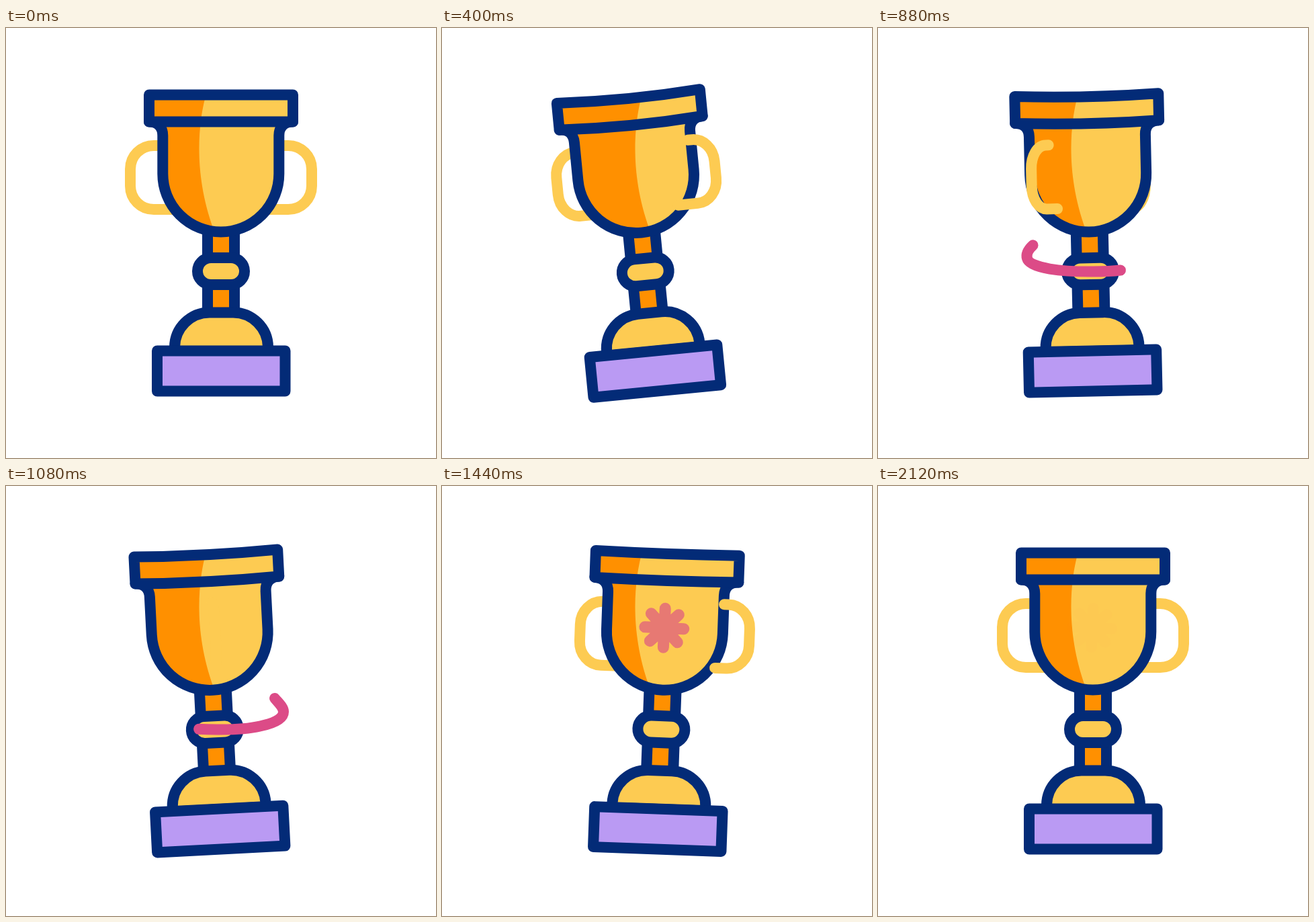
Recreate the animation shown at these times as an HTML page with a canvas. Size 640 by 640 pixels, loop 2.4 s.

```html
<!DOCTYPE html>
<html lang="en">
<head>
<meta charset="utf-8">
<title>Trophy</title>
<style>
  html, body { margin: 0; width: 100%; height: 100%; overflow: hidden; background: #fff; }
  canvas { display: block; width: 100vw; height: 100vh; }
</style>
</head>
<body>
<canvas id="stage" width="640" height="640"></canvas>
<script>
const ctx = document.getElementById('stage').getContext('2d');
const LOOP = 2400;
const NAVY = '#032b77', YELLOW = '#fdcb52', ORANGE = '#ff9000', PURPLE = '#ba9af3', PINK = '#dc4b87';

const clamp = v => Math.max(0, Math.min(1, v));
const ramp = (t, a, b) => clamp((t - a) / (b - a));

// Sine ease in and out between [time, value] keys.
function swing(keys, t) {
  let i = 0;
  while (i < keys.length - 2 && t >= keys[i + 1][0]) i++;
  const [t0, a] = keys[i], [t1, b] = keys[i + 1];
  return a + (b - a) * (1 - Math.cos(Math.PI * ramp(t, t0, t1))) / 2;
}

// Monotone cubic through [time, value] keys, at rest on both ends.
function track(keys, t) {
  const n = keys.length - 1;
  if (t >= keys[n][0]) return keys[n][1];
  let i = 0;
  while (t >= keys[i + 1][0]) i++;
  const rate = k => (keys[k + 1][1] - keys[k][1]) / (keys[k + 1][0] - keys[k][0]);
  const slope = k => {
    if (k === 0 || k === n) return 0;
    const a = rate(k - 1), b = rate(k);
    return a * b <= 0 ? 0 : 2 * a * b / (a + b);
  };
  const h = keys[i + 1][0] - keys[i][0], u = (t - keys[i][0]) / h;
  const s = u * u * (3 - 2 * u);
  return keys[i][1] * (1 - s) + keys[i + 1][1] * s +
    h * (slope(i) * u * (1 - u) * (1 - u) - slope(i + 1) * u * u * (1 - u));
}

const TILT = [[0, 0], [360, -6], [680, 5], [1000, -4], [1320, 3], [1640, 0]];
const TURN = [[0, 0], [400, 151], [640, 173], [880, 231], [1280, 310], [1640, 360]];
const FOOT = [[0, 76], [400, 66], [640, 88], [880, 75], [1280, 86], [1640, 76]];
const SAG = [[0, 0], [400, 7], [640, 6.4], [880, 5.2], [1280, 4.2], [1640, 0]];

const cup = new Path2D('M213 139.5C226 139.5 233.3 148 233.3 160V217A86.5 86.5 0 0 0 406.3 217V160C406.3 148 413.5 139.5 427 139.5');
const shade = new Path2D('M0 60H306L299 95C288 130 276 210 309 300L313 330H0Z');
const dome = new Path2D('M251 481V475A52 52 0 0 1 303 423.5H338A52 52 0 0 1 390 475V481Z');
const base = new Path2D('M225 480.5H415.5V540.5H225Z');
const stem = new Path2D('M300 300H340V428H300Z');
const knob = new Path2D();
knob.roundRect(285, 342, 70, 40, 20);

const RIBBON = 'M238 317C228 325 219 333 222 343C226 358 275 363 320 362.5C350 362.5 365 360.5 378 357.5' +
  'C395 354 413 348 413 336C413 329 405 322 400 316';
const ribbon = new Path2D(RIBBON);
const probe = document.createElementNS('http://www.w3.org/2000/svg', 'path');
probe.setAttribute('d', RIBBON);
const ribbonLength = probe.getTotalLength();

function tiltFrame(angle) {
  ctx.setTransform(1, 0, 0, 1, 0, 0);
  ctx.translate(320, 540);
  ctx.rotate(angle);
  ctx.translate(-320, -540);
}

function stroke(path, color, width = 16) {
  ctx.strokeStyle = color;
  ctx.lineWidth = width;
  ctx.stroke(path);
}

function part(path, fill) {
  ctx.fillStyle = fill;
  ctx.fill(path);
  stroke(path, NAVY);
}

// The shadow edge stays still on the stage while the metal moves under it.
function shadedPart(path) {
  ctx.fillStyle = YELLOW;
  ctx.fill(path);
  ctx.save();
  ctx.clip(path);
  ctx.setTransform(1, 0, 0, 1, 0, 0);
  ctx.fillStyle = ORANGE;
  ctx.fill(shade);
  ctx.restore();
  stroke(path, NAVY);
}

function rim(sag) {
  const p = new Path2D();
  p.moveTo(213, 99.5);
  p.quadraticCurveTo(320, 99.5 + sag, 427, 99.5);
  p.lineTo(427, 139.5);
  p.quadraticCurveTo(320, 139.5 + sag, 213, 139.5);
  p.closePath();
  return p;
}

function handle(c, foot, dy) {
  const p = new Path2D(), x = r => 320 + r * c;
  const top = 175 + dy, low = 270 + dy;
  p.moveTo(x(93), top);
  p.lineTo(x(100), top);
  p.bezierCurveTo(x(119.5), top, x(135), top + 15.5, x(135), top + 35);
  p.lineTo(x(135), low - 35);
  p.bezierCurveTo(x(135), low - 15.5, x(119.5), low, x(100), low);
  p.lineTo(x(foot), low);
  stroke(p, YELLOW);
}

function star(angle, alpha) {
  if (alpha <= 0) return;
  const x = 319 + 329 * Math.sin(angle), y = 540 - 329 * Math.cos(angle);
  const p = new Path2D();
  for (let i = 0; i < 4; i++) {
    const a = i * Math.PI / 4 + 0.05;
    const dx = 29 * Math.cos(a), dy = 29 * Math.sin(a);
    p.moveTo(x - dx, y - dy);
    p.lineTo(x + dx, y + dy);
  }
  ctx.globalAlpha = alpha;
  stroke(p, PINK, 17);
  ctx.globalAlpha = 1;
}

function drawRibbon(t) {
  const from = ramp(t, 860, 1425) * ribbonLength;
  const to = ramp(t, 545, 1045) * ribbonLength;
  if (to - from < 0.5) return;
  ctx.setLineDash([0, from, to - from, ribbonLength * 2]);
  // Skip the empty leading dash so that no round cap shows at the start.
  ctx.setLineDash([to - from, ribbonLength * 2]);
  ctx.lineDashOffset = -from;
  stroke(ribbon, PINK);
  ctx.setLineDash([]);
  ctx.lineDashOffset = 0;
}

function draw(t) {
  const angle = swing(TILT, t) * Math.PI / 180;
  const turn = track(TURN, t) * Math.PI / 180;
  const foot = track(FOOT, t);
  const c = Math.cos(turn), s = Math.sin(turn);
  const moving = Math.abs(s) > 0.01;
  const front = s > 0 ? -c : c;

  ctx.setTransform(1, 0, 0, 1, 0, 0);
  ctx.fillStyle = '#fff';
  ctx.fillRect(0, 0, 640, 640);
  ctx.lineCap = ctx.lineJoin = 'round';

  tiltFrame(angle);
  handle(-front, 72, 0);
  if (!moving) handle(front, 72, 0);
  part(stem, ORANGE);
  part(knob, YELLOW);
  part(dome, YELLOW);
  part(base, PURPLE);
  shadedPart(cup);
  shadedPart(rim(track(SAG, t)));
  if (moving) handle(front, foot, -2);

  ctx.setTransform(1, 0, 0, 1, 0, 0);
  star(angle, ramp(t, 1160, 1600) * (1 - ramp(t, 1680, 2125)));
  drawRibbon(t);
}

const start = performance.now();
function tick() {
  draw((performance.now() - start) % LOOP);
  requestAnimationFrame(tick);
}
tick();
</script>
</body>
</html>
```
